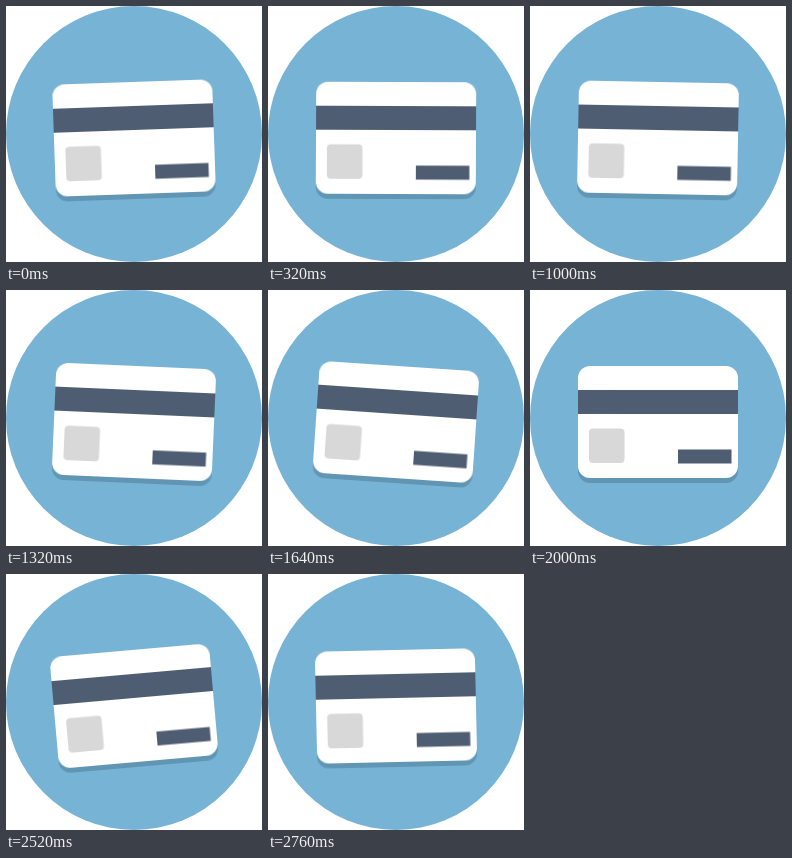
An HTML page for the animation above (2800 ms loop, 256 by 256 pixels).

```html
<!DOCTYPE html>
<html lang="en">
<head>
<meta charset="utf-8">
<title>Swinging card</title>
<style>
  html, body {
    margin: 0;
    width: 100%;
    height: 100%;
    overflow: hidden;
    background: #fff;
  }
  svg {
    display: block;
    width: 100%;
    height: 100%;
  }
  .card {
    transform-origin: 128px 132px;
    animation: swing 2800ms infinite;
  }
  @keyframes swing {
    0% {
      transform: rotate(-2deg);
      animation-timing-function: cubic-bezier(.1, .45, .4, 1);
    }
    /* short rest before the next swing */
    31.43%, 34.64% {
      transform: rotate(1.05deg);
      animation-timing-function: cubic-bezier(.42, 0, .6, 1);
    }
    59.3% {
      transform: rotate(3.9deg);
      animation-timing-function: cubic-bezier(.4, 0, .6, 1);
    }
    86.43% {
      transform: rotate(-5.5deg);
      animation-timing-function: cubic-bezier(.4, 0, .65, .6);
    }
    100% { transform: rotate(-.65deg); }
  }
</style>
</head>
<body>
<svg viewBox="0 0 256 256">
  <circle cx="128" cy="128" r="128" fill="#77b3d5"/>
  <g class="card">
    <rect x="48" y="81" width="160" height="112" rx="12" fill="#6095b4"/>
    <rect x="48" y="76" width="160" height="112" rx="12" fill="#fff"/>
    <rect x="48" y="100" width="160" height="24" fill="#4f5d73"/>
    <rect x="59" y="138.5" width="35.5" height="34.5" rx="4" fill="#d8d8d8"/>
    <rect x="148" y="159.5" width="53.5" height="14" fill="#4f5d73"/>
  </g>
</svg>
</body>
</html>
```
